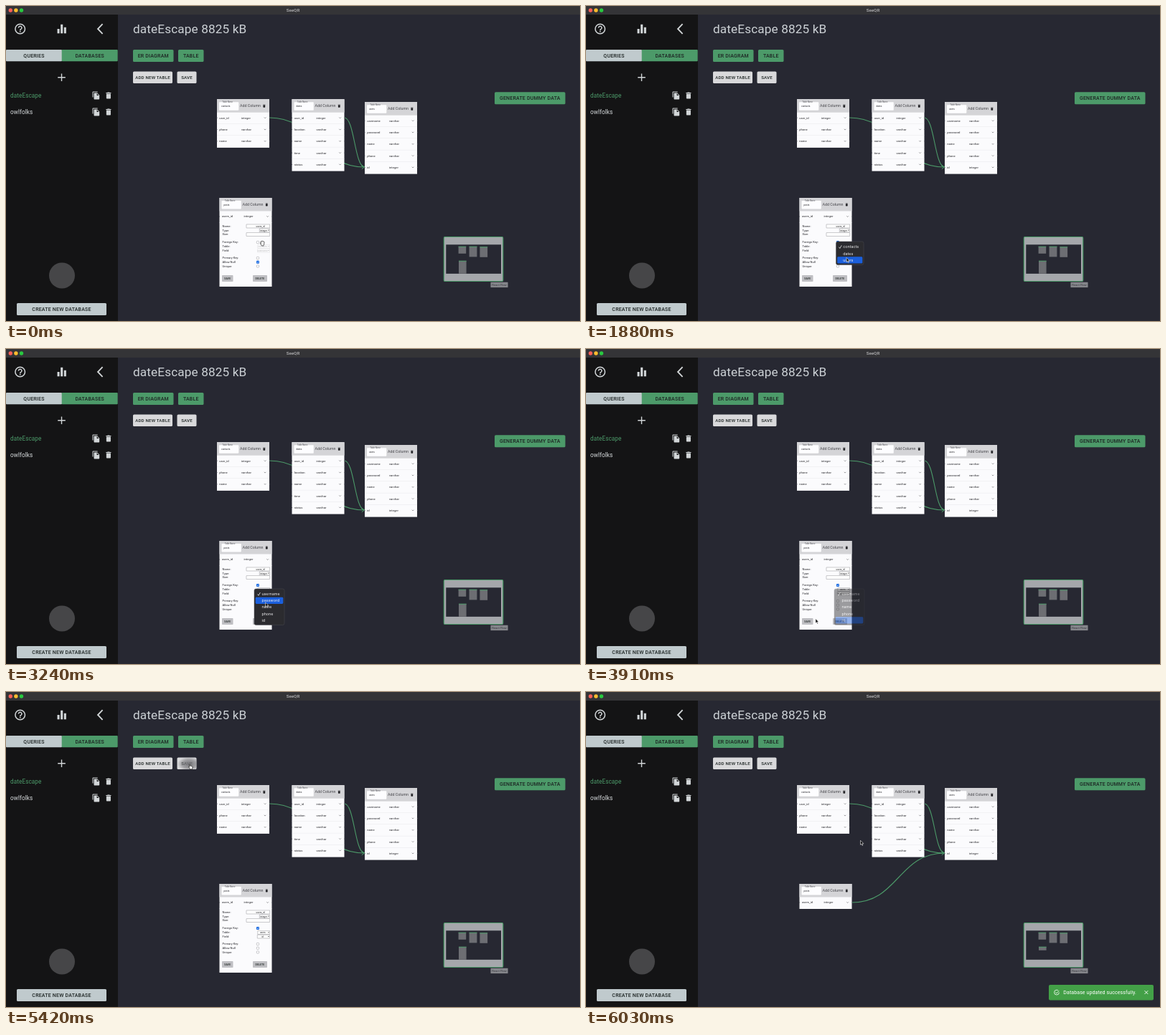
Write an HTML page that moves like this. It is 800x440 px and loops after 6060 ms.

```html
<!DOCTYPE html>
<html lang="en">
<head>
<meta charset="utf-8">
<title>Database diagram editor</title>
<style>
html, body { margin: 0; width: 800px; height: 440px; overflow: hidden; background: #272832; }
svg { display: block; }
text { font-family: Roboto, Arial, sans-serif; white-space: pre; }
.menu text { font-family: Inter, Roboto, sans-serif; }
</style>
</head>
<body>
<svg id="stage" width="800" height="440" viewBox="0 0 800 440"></svg>
<script>
const LOOP = 6060;
const GREEN = '#4c9a69', PALE = '#c0cacd', INK = '#222226';
const stage = document.getElementById('stage');

// Drawing helpers
const rect = (x, y, w, h, fill, r = 0, more = '') =>
  `<rect x="${x}" y="${y}" width="${w}" height="${h}" rx="${r}" fill="${fill}" ${more}/>`;
const text = (x, cy, str, size, fill = INK, more = '') =>
  `<text x="${x}" y="${cy + size * 0.355}" font-size="${size}" fill="${fill}" ${more}>${str}</text>`;
const line = (d, stroke, width = 1, more = '') =>
  `<path d="${d}" fill="none" stroke="${stroke}" stroke-width="${width}" ${more}/>`;
const group = (id, body, more = '') => `<g id="${id}" ${more}>${body}</g>`;
// Places a 24-unit icon centred on cx, cy
const icon = (d, cx, cy, s, fill) =>
  `<path transform="translate(${cx - 12 * s} ${cy - 12 * s}) scale(${s})" d="${d}" fill="${fill}"/>`;

const ICONS = {
  bars: 'M10 20h4V4h-4v16zm-6 0h4v-8H4v8zM16 9v11h4V9h-4z',
  ask: 'M11 18h2v-2h-2v2zM12 6c-2.21 0-4 1.79-4 4h2c0-1.1.9-2 2-2s2 .9 2 2c0 2-3 1.75-3 5h2c0-2.25 3-2.5 3-5 0-2.21-1.79-4-4-4z',
  copy: 'M16 1H4c-1.1 0-2 .9-2 2v14h2V3h12V1zm-1 4l6 6v10c0 1.1-.9 2-2 2H7.99C6.89 23 6 22.1 6 21l.01-14c0-1.1.89-2 1.99-2h7zm-1 7h5.5L14 6.5V12z',
  trash: 'M6 19c0 1.1.9 2 2 2h8c1.1 0 2-.9 2-2V7H6v12zM19 4h-3.5l-1-1h-5l-1 1H5v2h14V4z'
};

function button(x, y, w, h, label, fill, size = 7, r = 1.6) {
  return rect(x, y, w, h, fill, r) +
    text(x + w / 2, y + h / 2, label, size, '#1d2423',
      `text-anchor="middle" font-weight="500" letter-spacing="${size * 0.0286}"`);
}

function titleBar() {
  const lights = ['#fe5f57', '#febc2e', '#28c840']
    .map((c, i) => `<circle cx="${6.3 + i * 7.6}" cy="6" r="2.7" fill="${c}"/>`).join('');
  return rect(0, 0, 800, 12, '#343437') + lights +
    text(400, 6, 'SeeQR', 6.2, '#b4b4b6', 'text-anchor="middle" font-weight="500"');
}

function sidebar() {
  const item = (cy, label, fill) =>
    text(6, cy, label, 8.2, fill, 'letter-spacing=".077"') +
    icon(ICONS.copy, 125.6, cy, 0.51, '#d2d6d8') +
    icon(ICONS.trash, 142.9, cy, 0.51, '#d2d6d8');
  return rect(0, 12, 156, 428, '#141415') +
    '<circle cx="19.7" cy="32" r="6.8" fill="none" stroke="#d2d6d8" stroke-width="1.5"/>' +
    icon(ICONS.ask, 19.7, 32, 0.75, '#d2d6d8') +
    icon(ICONS.bars, 77.7, 32, 0.77, '#d2d6d8') +
    line('M134.6 25.2L128 32l6.6 6.8', '#d2d6d8', 1.8) +
    button(0, 61, 78, 16.2, 'QUERIES', PALE, 7, 1) +
    button(77.7, 61, 78, 16.2, 'DATABASES', GREEN, 7, 1) +
    line('M72.2 99.8h10.6M77.5 94.5v10.6', '#d2d6d8', 1.4) +
    item(125, 'dateEscape', GREEN) + item(148, 'owlfolks', '#d8dcde') +
    '<circle cx="78" cy="376.5" r="18" fill="#464648"/>' +
    button(15, 415, 125, 17, 'CREATE NEW DATABASE', PALE);
}

function toolbar() {
  return text(177, 32.2, 'dateEscape 8825 kB', 17.2, '#ccd1d5', 'letter-spacing=".126"') +
    button(177, 61, 56.5, 17, 'ER DIAGRAM', GREEN) +
    button(240, 61, 35.5, 17, 'TABLE', GREEN) +
    button(177, 91.5, 55, 16.5, 'ADD NEW TABLE', '#d9d9db', 6.15) +
    button(238.5, 91.5, 27, 16.5, 'SAVE', '#d9d9db', 6.15) +
    button(681, 120.3, 98.5, 17, 'GENERATE DUMMY DATA', GREEN) +
    rect(238.5, 91.5, 27, 16.5, 'url(#press)', 1.6, 'id="ripple"');
}

const edge = (x1, y1, x2, y2) => {
  const m = (x1 + x2) / 2;
  return line(`M${x1} ${y1}C${m} ${y1} ${m} ${y2} ${x2} ${y2}`, GREEN, 1.1);
};

const tableHeight = n => 35 + 16.35 * (n - 1);

function table(x, y, name, rows, extra = 0) {
  const h = tableHeight(rows.length) + extra;
  let out = rect(x, y, 73, h, '#fbfbfd') + rect(x, y, 73, 18.5, '#d4d4d7') +
    rect(x + 3, y + 4, 27.3, 11.6, '#fdfdff', 0.8) +
    text(x + 7.5, y + 3.6, 'Table Name', 2.7, '#55555a') +
    text(x + 6, y + 9.7, name, 3.2, INK) +
    text(x + 32, y + 9.4, 'Add Column', 5.3, '#45454a') +
    icon(ICONS.trash, x + 65.8, y + 9.5, 0.23, INK);
  rows.forEach(([label, type], i) => {
    const cy = y + 26 + 16.3 * i;
    if (i) out += rect(x, cy - 8.2, 73, 0.4, '#e2e2e6');
    out += text(x + 3.2, cy, label, 4.2) + text(x + 34, cy, type, 4.2) +
      line(`M${x + 65.8} ${cy - 0.7}l1.3 1.3l1.3 -1.3`, '#55555a', 0.6) +
      `<circle cx="${x + 73.4}" cy="${cy}" r=".6" fill="#50525c"/>` +
      `<circle cx="${x}" cy="${cy}" r=".6" fill="#50525c"/>`;
  });
  return out;
}

const checkbox = (cy, id, on) =>
  rect(349.3, cy - 1.6, 3.3, 3.3, '#fff', 0.9, 'stroke="#8a8a90" stroke-width=".45"') +
  group(id, rect(349, cy - 1.9, 3.9, 3.9, '#1f6fe5', 0.9) +
    line(`M350 ${cy}l.8 .9l1.3 -1.7`, '#fff', 0.55), on ? '' : 'display="none"');

function select(x, cy, label, id, labelId) {
  const w = 367.7 - x;
  return group(id, rect(x, cy - 2.4, w, 4.9, '#fff', 0.3, 'stroke="#77777c" stroke-width=".4"') +
    text(x + (w - 3) / 2, cy, label, 3.2, INK, `text-anchor="middle" id="${labelId}"`) +
    `<path d="M365 ${cy - 0.6}h1.8l-.9 1.3z" fill="#222"/>`);
}

function form() {
  const labels = [[307.5, 'Name:'], [313.3, 'Type:'], [319, 'Size:'], [330, 'Foreign Key:'],
    [335.9, 'Table:'], [341.5, 'Field:'], [352, 'Primary Key:'], [357.7, 'Allow Null'], [363.4, 'Unique:']];
  const box = 'stroke="#77777c" stroke-width=".4"';
  return labels.map(([cy, s]) => text(301.5, cy, s, 4.1)).join('') +
    rect(335, 305, 32.7, 5, '#fff', 0.3, box) +
    text(354.5, 307.5, 'users_id', 3.3, INK, 'text-anchor="middle"') +
    select(353.3, 313.4, 'integer', 'type', 'typeText') +
    rect(335, 316.6, 32.7, 4.9, '#fff', 0.3, box) +
    checkbox(330, 'foreign') +
    select(350.8, 336, 'contacts', 'tableSel', 'tableText') +
    select(350.3, 341.6, 'username', 'fieldSel', 'fieldText') +
    checkbox(352, 'primary') + checkbox(357.7, 'nullable', true) + checkbox(363.4, 'unique') +
    button(301, 376, 15.5, 9, 'SAVE', '#bfbfc3', 3.5, 0.8) +
    button(344, 376, 20, 9, 'DELETE', '#bfbfc3', 3.5, 0.8);
}

function miniMap() {
  const node = (x, y, w, h, id = '') =>
    rect(x, y, w, h, '#6d6e73', 0, `id="${id}"`) + rect(x, y, w, 1, GREEN);
  return rect(610.3, 322.5, 82.4, 62, '#a5a7ab', 1.5, `stroke="${GREEN}" stroke-width="1.2"`) +
    rect(613.3, 333.3, 76.7, 40.6, '#272832') +
    node(630.6, 335.8, 10.6, 10) + node(645.6, 335.8, 10.8, 14.6) +
    node(660.4, 336.3, 10.7, 14.5) + node(631, 355.8, 10.6, 18, 'miniPosts') +
    rect(675.5, 385.8, 24, 7.3, '#85868b') +
    text(687.5, 389.5, 'React Flow', 4.2, '#3c3d43', 'text-anchor="middle"');
}

const menus = {
  tableMenu: { x: 348.5, y: 329, w: 38.5, first: 336.4, step: 9.25, left: 358.3,
    items: ['contacts', 'dates', 'users'], open: 1450, pick: 2200, fade: 2260 },
  fieldMenu: { x: 346, y: 335, w: 42, first: 342.2, step: 9.15, left: 356.4,
    items: ['username', 'password', 'name', 'phone', 'id'], open: 2850, pick: 3650, fade: 3780 }
};

function menu(id) {
  const m = menus[id], n = m.items.length;
  const h = m.step * n + 4.8;
  return group(id, rect(m.x, m.y, m.w, h, '#2b2b2f', 2.4, 'stroke="#4b4b50" stroke-width=".5"') +
    rect(m.x + 1.7, 0, m.w - 3.4, m.step, '#1b5fdc', 1.4, `id="${id}Hot"`) +
    line(`M${m.left - 5.8} ${m.first + 0.3}l1.3 1.8l2.5 -4.2`, '#f0f0f2', 0.8) +
    m.items.map((s, i) => text(m.left, m.first + m.step * i, s, 5.35, '#f0f0f2')).join(''),
    'class="menu"');
}

function toast() {
  return rect(645, 409, 146, 21.5, '#43a047', 2) +
    '<circle cx="656" cy="419.6" r="3.4" fill="none" stroke="#fff" stroke-width=".8" stroke-dasharray="18 3.4"/>' +
    line('M654.3 419.4l1.5 1.6l3.4 -3.6', '#fff', 0.8) +
    text(665.3, 419.6, 'Database updated successfully.', 7.1, '#fff', 'letter-spacing=".05"') +
    line('M778.5 417.2l4.8 4.8m0 -4.8l-4.8 4.8', '#fff', 0.9);
}

const glove = 'fill="#fff" stroke="#111" stroke-width=".65" stroke-linejoin="round"';
const cursors =
  group('arrow', '<path d="M0 0v6.1l1.4-1.3l1 2.3l1-.4l-1-2.3h2z" fill="#0c0c0d" stroke="#fff" stroke-width=".55"/>') +
  group('grab', `<path d="M.6 4.4C-.6 3 .3 2.7 1.2 3.6L.7 1.5C.6.6 1.6.5 1.8 1.2L2.1 .6C2.3-.1 3.2 0 3.3.7C3.8.2 4.5.4 4.5 1.3C5.2.9 5.8 1.4 5.7 2.1L5.2 5.2L4.6 6.9H2.1Z" ${glove}/>`) +
  group('point', `<path d="M.9 4.6C-.3 3.4.4 2.8 1.4 3.7L1 .8C1-.1 2-.1 2.1.7L2.5 2.6C3.2 2.2 3.6 2.5 3.7 2.8C4.3 2.5 4.7 2.8 4.8 3.2C5.5 3 5.8 3.4 5.8 4L5.3 5.8L4.8 7.2H2.4Z" ${glove}/>`);

const varchar = s => [s, 'varchar'];
stage.innerHTML =
  `<defs><radialGradient id="press" cx=".62" cy=".55" r=".6">
    <stop offset="0" stop-color="#77777b"/><stop offset=".6" stop-color="#77777b" stop-opacity=".6"/>
    <stop offset="1" stop-color="#77777b" stop-opacity="0"/></radialGradient></defs>` +
  rect(0, 0, 800, 440, '#272832') + titleBar() + sidebar() + toolbar() +
  edge(367, 156, 500, 225) + edge(471.5, 156, 500, 225) +
  group('newEdge', edge(370.5, 294, 500, 225)) +
  line('M495.8 222.2L499.6 225L495.8 227.8', GREEN, 1) +
  table(294, 130.2, 'contacts', [['user_id', 'integer'], varchar('phone'), varchar('name')]) +
  table(398.5, 130.2, 'dates', [['user_id', 'integer'], ...['location', 'name', 'time', 'status'].map(varchar)]) +
  table(500, 134.2, 'users', [...['username', 'password', 'name', 'phone'].map(varchar), ['id', 'integer']]) +
  table(297.5, 268, 'posts', [['users_id', 'integer']]) +
  group('form', rect(297.5, 302.5, 73, 89.5, '#fbfbfd') + form()) +
  miniMap() + menu('tableMenu') + menu('fieldMenu') +
  group('toast', toast()) + group('cursor', cursors);

// Motion
const CHECK = 700, SAVED = 5510;
const path = [
  [0, 354.3, 328], [500, 351, 329], [1150, 350.3, 329], [1400, 357, 335], [1550, 358, 336],
  [1860, 363, 351.5], [2250, 363, 351.5], [2700, 360, 340], [2900, 360, 340.5],
  [3200, 361.5, 354], [3320, 361.5, 354], [3580, 361, 377.5], [3680, 361, 377.5],
  [3900, 320, 376.8], [4150, 309.5, 378], [4550, 309.5, 378], [5180, 254.3, 100.8],
  [5650, 254.3, 100.8], [6000, 382.5, 207.3], [6060, 382.5, 207.3]
];
const looks = [[0, 'grab'], [1300, 'arrow'], [4050, 'point'], [4620, 'arrow'], [5100, 'point'], [5720, 'arrow']];

const clamp = v => Math.max(0, Math.min(1, v));
const part = (t, from, span) => clamp((t - from) / span);
const smooth = k => k * k * (3 - 2 * k);
const el = id => document.getElementById(id);
const show = (id, on) => el(id).setAttribute('display', on ? 'inline' : 'none');
const fadeTo = (id, v) => el(id).setAttribute('opacity', v);

function cursorAt(t) {
  const i = Math.max(1, path.findIndex(p => p[0] > t));
  const [t0, x0, y0] = path[i - 1], [t1, x1, y1] = path[i];
  const k = smooth(part(t, t0, t1 - t0));
  return [x0 + (x1 - x0) * k, y0 + (y1 - y0) * k];
}

function drawMenu(id, t) {
  const m = menus[id];
  const y = cursorAt(Math.min(t, m.pick))[1];
  const row = Math.max(0, Math.min(m.items.length - 1, Math.round((y - m.first) / m.step)));
  const blink = t > m.pick && t < m.pick + 50;
  show(id, t >= m.open && t < m.fade + 240);
  show(id + 'Hot', !blink);
  el(id + 'Hot').setAttribute('y', m.first + m.step * (row - 0.5));
  fadeTo(id, 1 - part(t, m.fade, 240));
}

function draw(t) {
  const linked = t >= CHECK, saved = t >= SAVED;
  show('foreign', linked);
  show('nullable', !linked);
  fadeTo('tableSel', linked ? 1 : 0.3);
  fadeTo('fieldSel', linked ? 1 : 0.3);
  el('tableText').textContent = t < menus.tableMenu.fade ? 'contacts' : 'users';
  el('fieldText').textContent = t < 4000 ? 'username' : 'id';
  drawMenu('tableMenu', t);
  drawMenu('fieldMenu', t);

  show('form', !saved);
  show('newEdge', saved);
  el('miniPosts').setAttribute('height', saved ? 5 : 18);
  fadeTo('ripple', part(t, 5300, 100) * (1 - part(t, 5480, 250)));

  const grow = smooth(part(t, SAVED, 225));
  const s = 0.75 + 0.25 * grow;
  show('toast', saved);
  fadeTo('toast', grow);
  el('toast').setAttribute('transform', `translate(718 419.7) scale(${s}) translate(-718 -419.7)`);

  const [x, y] = cursorAt(t);
  const look = looks.filter(l => l[0] <= t).pop()[1];
  ['arrow', 'grab', 'point'].forEach(id => show(id, id === look));
  el('cursor').setAttribute('transform', `translate(${x} ${y})`);
}

function tick() {
  draw(performance.now() % LOOP);
  requestAnimationFrame(tick);
}
tick();
</script>
</body>
</html>
```
